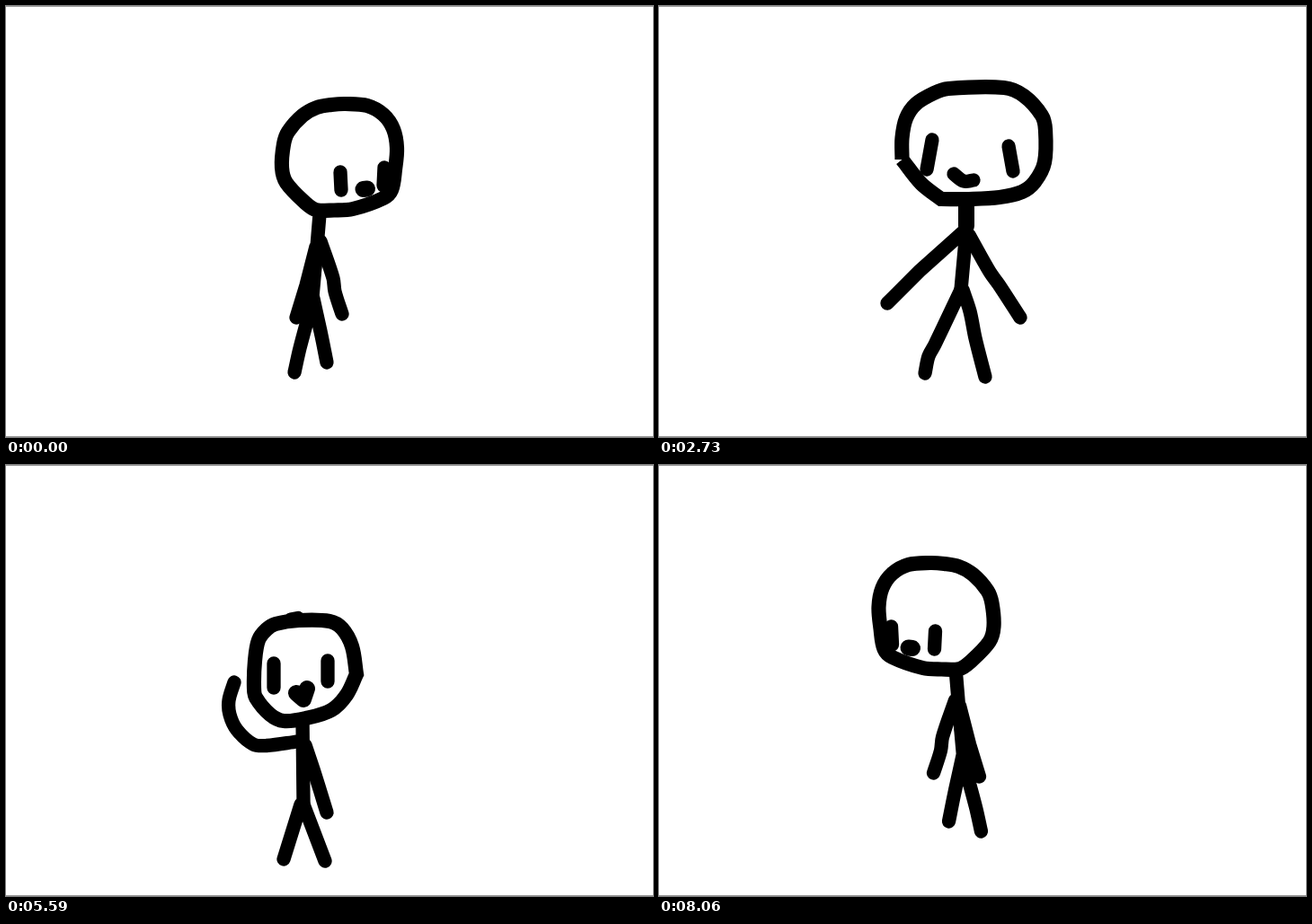
These frames come from a looping animation (720 by 480 pixels, 8190 ms). An HTML page:

```html
<!DOCTYPE html>
<html>
<head>
<meta charset="utf-8">
<style>
html, body { margin: 0; width: 100%; height: 100%; overflow: hidden; background: #fff; }
svg { display: block; }
.ink { fill: none; stroke: #000; stroke-width: 15.3; stroke-linecap: round; stroke-linejoin: round; }
.head { stroke-width: 16.2; stroke-linejoin: miter; }
.thick { stroke-width: 18; }
</style>
</head>
<body>
<svg width="720" height="480" viewBox="0 0 720 480">
<defs>
  <!-- side view without its front arm -->
  <g id="side">
    <path class="head soft" d="M346 113L362 110L378 109L402 111L420 121L431 137L435 158L433 182L429 205L420 214L386 226L365 227.500L345 227L334 220L312 197L307 180L309 154L314 140L330 122Z"/>
    <path d="M372 185L373 205M421 180L420 200"/>
    <path class="thick" d="M397.5 204L402 203.500"/>
    <path d="M349 232L346 268L340 335M345 268L334 311L323 347"/>
    <path class="thick" d="M343 285L336 340"/>
    <path class="soft" d="M342 326L351 367L357 397M338 340L327 381L321 408"/>
  </g>
  <g id="A"><use href="#side"/><path class="soft" d="M350 262L364 303L366 318L374 343"/></g>
  <g id="R"><use href="#side"/><path d="M350 262L430 263L513 256"/></g>

  <!-- hands on hips -->
  <g id="B">
    <path class="head soft" d="M350 125L364 125.500L378 128L408 139.500L430 156L440 182L438 213L428 237L408 255L382 264L345 260L322 246L310 225L309 195L314 165L324 143L336 130Z"/>
    <path d="M342 201L337 220M410 218L404 237"/>
    <path class="soft" d="M362 228L367 238L375 242L381 239L384 230"/>
    <path d="M347 264L342 290L333 338M341 286L297 318L333 335M345 291L376 319L338 328"/>
    <path class="soft" d="M333 338L304 371L297 386L297 421M333 338L361 360L365 374L365 420"/>
  </g>

  <!-- front view; a doubled point keeps a sharp corner -->
  <g id="C">
    <path class="head soft" d="M270.500 171L270.500 171L270.500 147L275 125L286 109L306 97L322 92L384 91L406 100L426 122L430 138L429 174L418 196L404 207L379 213L345 215L314 215L314 215L292 198Z"/>
    <path d="M304 149L298 182M389 156L394 184"/>
    <path class="soft" d="M328 187L339 195L350 194"/>
    <path class="thick" d="M342 222L342 245"/>
    <path d="M342 250L336 316M338 252L290 295L254 331"/>
    <path class="soft" d="M345 255L368 296L378 310L402 347"/>
    <path class="soft" d="M336 316L307 377L300 390L296 409M338 316L346 340L352 370L363 413"/>
  </g>

  <!-- waving, with three arm positions -->
  <g id="face">
    <path class="head soft" d="M300 177L326 173L360 174L374 182L385 202L390 233L390 233L379 256L362 273L334 282L309 285L294 278L278 259L276 248L277 218L281 195L290 183Z"/>
    <path d="M317 172L325 170.500M298 221L298 248M358 218L358 241"/>
    <path class="thick" d="M323 254L331 261L335 249"/>
  </g>
  <g id="trunk">
    <path d="M330 284L331 376"/>
    <path class="soft" d="M333 312L344 345L357 387"/>
    <path d="M328 378L309 439M331 378L355 441"/>
  </g>
  <g id="W"><use href="#face"/><use href="#trunk"/><path class="soft" d="M324 308L290 312.500L275 311L257 295L249 278L248 262L254 242"/></g>
  <g id="V"><use href="#face" x="1" y="-2"/><use href="#trunk"/><path class="soft" d="M324 308L290 312.500L275 311L257 296L246 279L242 262L244 242"/></g>
  <g id="U"><use href="#face" x="3" y="-5"/><use href="#trunk"/><path class="soft" d="M324 308L290 312.500L275 311L257 297L243 280L238 263L235 243"/></g>
</defs>
<path d="M0 .5H720M0 479.500H720" stroke="#999"/>
<use id="figure" class="ink" href="#A"/>
</svg>
<script>
const STEP = 130;
// One letter per step; lower case is mirrored.
const dance = 'AEACaeaA' + 'BbDdbBA' + 'BAaCKMC' + 'MKMCMKMCMKMCM' +
  'WVUVWVUVWVUW' + 'CAC' + 'MKARAR' + 'CKarara';
// Poses that reuse another drawing: [drawing, dx, dy]
const shifted = { E: ['A', 9, 6], D: ['B', 4, 5], M: ['C', 0, 13], K: ['C', 0, 26] };
const figure = document.getElementById('figure');
let shown;

// Turns straight segments into a curve through the same points.
function smooth(part) {
  const closed = part.includes('Z');
  const pts = part.match(/[\d.]+ [\d.]+/g).map(p => p.split(' ').map(Number));
  const n = pts.length;
  const at = i => closed ? pts[(i + n) % n] : pts[Math.max(0, Math.min(n - 1, i))];
  const handle = (i, reach) => {
    const [x0, y0] = at(i - 1), [x, y] = at(i), [x1, y1] = at(i + 1);
    const k = reach / (Math.hypot(x1 - x0, y1 - y0) || 1);
    return [x + (x1 - x0) * k, y + (y1 - y0) * k];
  };
  let d = 'M' + pts[0];
  for (let i = 0; i < (closed ? n : n - 1); i++) {
    const [x, y] = at(i), [x1, y1] = at(i + 1);
    const reach = Math.hypot(x1 - x, y1 - y) / 3;
    d += `C${handle(i, reach)} ${handle(i + 1, -reach)} ${x1},${y1}`;
  }
  return closed ? d + 'Z' : d;
}

for (const path of document.querySelectorAll('.soft')) {
  path.setAttribute('d', path.getAttribute('d').match(/M[^M]+/g).map(smooth).join(''));
}

function show(letter) {
  const name = letter.toUpperCase();
  const [id, dx, dy] = shifted[name] || [name, 0, 0];
  const flip = letter === name ? '' : 'translate(679.5) scale(-1 1) ';
  figure.setAttribute('href', '#' + id);
  figure.setAttribute('transform', `${flip}translate(${dx} ${dy})`);
}

function tick() {
  const letter = dance[Math.floor(performance.now() / STEP) % dance.length];
  if (letter !== shown) show(shown = letter);
  requestAnimationFrame(tick);
}
tick();
</script>
</body>
</html>
```
